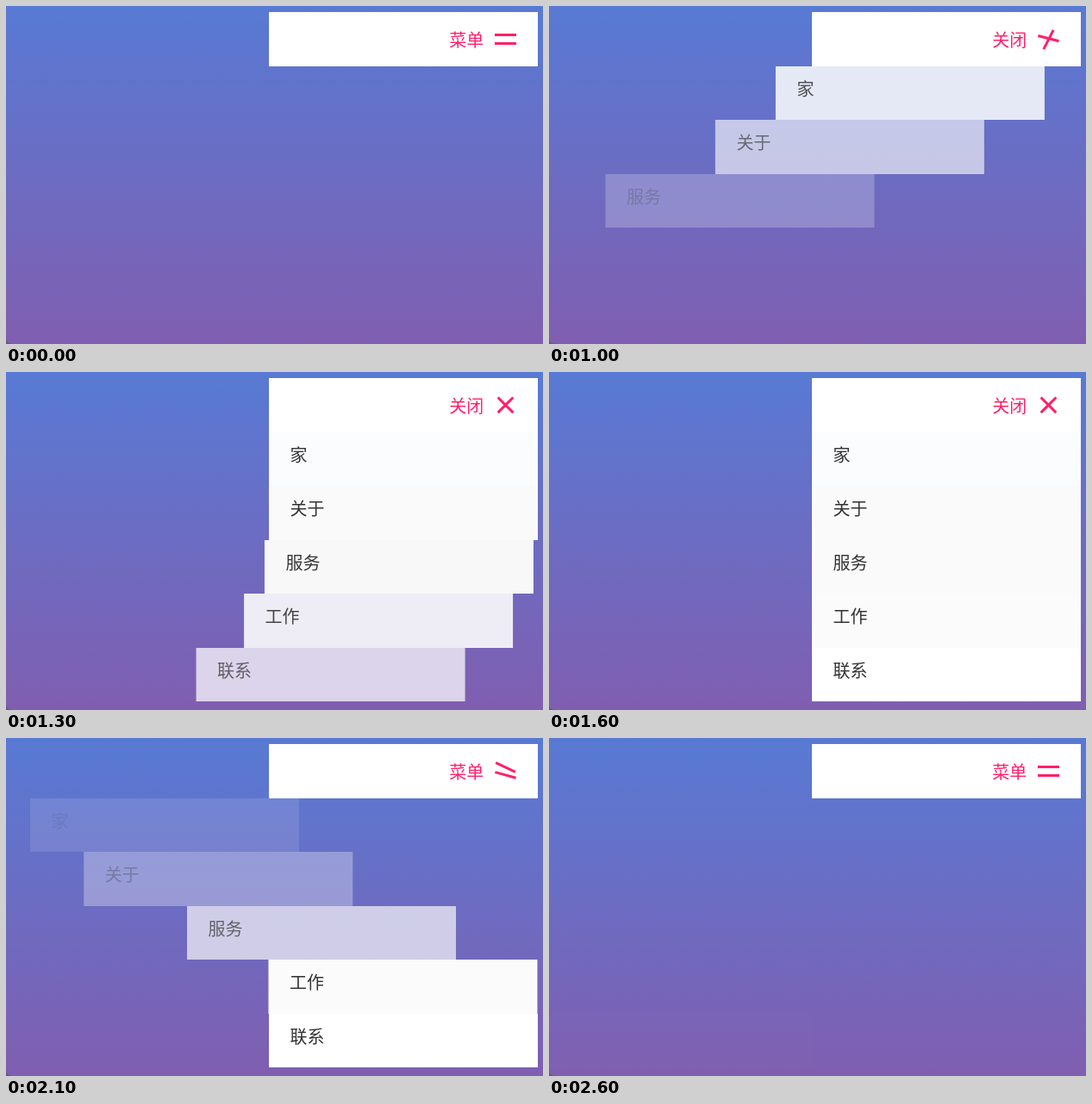
An HTML page with a canvas for the animation above (3200 ms loop, 623x392 px).

```html
<!DOCTYPE html>
<html lang="zh-CN">
<head>
<meta charset="utf-8">
<style>
  html, body { margin: 0; width: 100%; height: 100%; overflow: hidden; }
  canvas { display: block; }
</style>
</head>
<body>
<canvas id="stage" width="623" height="392"></canvas>
<script>
const ctx = document.getElementById('stage').getContext('2d');
const LOOP = 3200, STEP = 100, OPEN = 800, CLOSE = 1900;
const LEFT = 305, TOP = 7, WIDTH = 312, ROW = 62.5;
const PINK = '#ff1f69';
const ITEMS = [
  ['家', '#fafcfd'],
  ['关于', '#fafafa'],
  ['服务', '#fafafa'],
  ['工作', '#fbfbfc'],
  ['联系', '#ffffff'],
];

const sky = ctx.createLinearGradient(0, 0, 0, 392);
sky.addColorStop(0, '#587ad4');
sky.addColorStop(0.5, '#6c6cc2');
sky.addColorStop(1, '#805eb0');

// CSS "ease": cubic-bezier(.25, .1, .25, 1)
function ease(x) {
  if (x <= 0) return 0;
  if (x >= 1) return 1;
  const curve = (s, a, b) => 3 * s * (1 - s) ** 2 * a + 3 * s * s * (1 - s) * b + s ** 3;
  let lo = 0, hi = 1;
  for (let i = 0; i < 24; i++) {
    const mid = (lo + hi) / 2;
    if (curve(mid, 0.25, 0.25) < x) lo = mid; else hi = mid;
  }
  return curve(lo, 0.1, 1);
}

// How far open a part is, 0 to 1, given its stagger delay
function openness(time, delay) {
  if (time < OPEN) return 0;
  if (time < CLOSE) return ease((65 + (time - OPEN) * 1.105 - delay) / 500);
  return 1 - ease((82 + (time - CLOSE) * 1.1 - delay) / 500);
}

function label(text, x, centerY, color) {
  ctx.fillStyle = color;
  ctx.fillText(text, x, centerY + 7.6);
}

function row(index, x, color) {
  const y = Math.round(TOP + ROW * index);
  ctx.fillStyle = color;
  ctx.fillRect(x, y, WIDTH, Math.round(TOP + ROW * (index + 1)) - y);
  return y;
}

function bar(y, degrees) {
  ctx.save();
  ctx.translate(579.5, y);
  ctx.rotate(degrees * Math.PI / 180);
  ctx.fillStyle = PINK;
  ctx.fillRect(-12.5, -1.5, 25, 3);
  ctx.restore();
}

function draw(time) {
  ctx.globalAlpha = 1;
  ctx.font = '20px "Noto Sans CJK SC", "Noto Sans CJK", sans-serif';
  ctx.fillStyle = sky;
  ctx.fillRect(0, 0, 623, 392);

  // Shaded bottom-left corner
  ctx.fillStyle = '#625a86';
  ctx.beginPath();
  ctx.moveTo(0, 384);
  ctx.quadraticCurveTo(0, 392, 8, 392);
  ctx.lineTo(0, 392);
  ctx.fill();

  row(0, LEFT, '#fff');
  label(time >= OPEN && time < CLOSE ? '关闭' : '菜单', 514.3, 39, PINK);
  const turn = openness(time, 0);
  bar(33.5 + 4.8 * turn, 225 * turn);
  bar(43.5 - 5.2 * turn, 135 * turn);

  ITEMS.forEach(([text, color], i) => {
    const shown = openness(time, i * 100);
    const x = LEFT - WIDTH * (1 - shown);
    ctx.globalAlpha = shown;
    const y = row(i + 1, x, color);
    label(text, x + 24.5, y + 26.5, '#333');
  });
}

const start = performance.now();
function tick() {
  const time = (performance.now() - start) % LOOP;
  draw(Math.floor(time / STEP) * STEP);
  requestAnimationFrame(tick);
}
tick();
</script>
</body>
</html>
```
